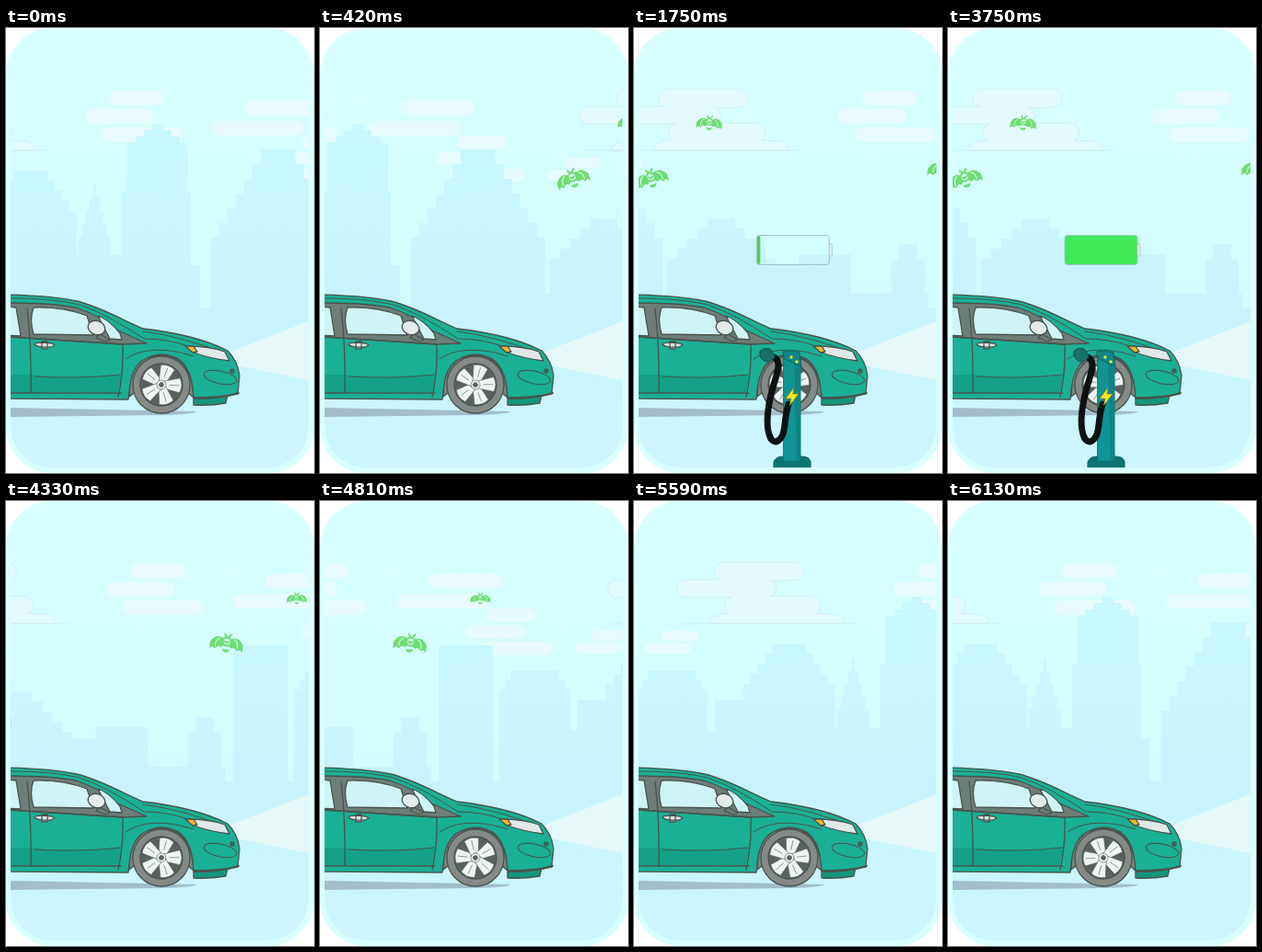
Animation of 335x484 px, one loop 6.16 s. Source, as an HTML page:

```html
<!DOCTYPE html>
<html lang="en">
<head>
<meta charset="utf-8">
<title>Electric car</title>
<style>
html, body { margin: 0; width: 100%; height: 100%; overflow: hidden; background: #fff; }
svg { display: block; width: 335px; height: 484px; }
</style>
</head>
<body>
<svg viewBox="0 0 335 484" fill="none" stroke-linejoin="round" stroke-linecap="round">
<defs>
  <linearGradient id="sky" x1="0" y1="0" x2="0" y2="1">
    <stop offset=".1" stop-color="#d8ffff"/><stop offset=".65" stop-color="#d1fbff"/>
  </linearGradient>
  <linearGradient id="haze" gradientUnits="userSpaceOnUse" x1="0" y1="100" x2="0" y2="478">
    <stop offset="0" stop-color="#c9f8ff"/><stop offset=".55" stop-color="#c8f3fe"/>
    <stop offset="1" stop-color="#cdf6ff"/>
  </linearGradient>
  <clipPath id="view"><rect x="5" y="5" width="324" height="473" rx="45"/></clipPath>
  <g id="bat">
    <path fill="#70dc73" d="M-4 -3Q-12 -8 -18 2Q-18 6 -18 10Q-15 5 -12 9Q-9 4 -6 7L0 3L6 7Q9 4 12 9Q15 5 18 10Q18 6 18 2Q12 -8 4 -3Z"/>
    <path stroke="#d8ffef" d="M-8 -3Q-13 0 -12 6M8 -3Q13 0 12 6"/>
    <circle r="4.500" fill="#d8ffef" stroke="#70dc73" stroke-width="2"/>
    <path stroke="#70dc73" stroke-width="2" d="M-1 -5L-3 -8M1 -5L4 -8M-2 0L0 1.500L2 0M-3 9L-1 11L0 9L1 11L3 9"/>
  </g>
</defs>

<rect width="335" height="484" rx="50" fill="#d9ffff"/>
<g clip-path="url(#view)">
  <rect x="5" width="324" height="478" fill="url(#sky)"/>
  <g id="clouds"></g>
  <g id="city"></g>
  <rect x="5" y="305" width="324" height="173" fill="url(#haze)"/>
  <g id="bats"></g>

  <path fill="#e5f8f8" d="M240 354L329 319V383L251 367Z"/>
  <path fill="#a3bdcb" d="M5 413L207 417Q205 420 170 421L5 423Z"/>

  <g stroke="#47544d" stroke-width="1.300">
    <path fill="#14967f" d="M204 401L241 399L239 408Q222 411 204 410Z"/>
    <path fill="#1ab096" d="M0 290Q48 291 77 297C105 304 125 317 149 327C175 330 214 337 241 351Q252 362 254 378L252 398Q230 402 204 402L202 385Q196 355 168 355Q137 357 133 404L0 403Z"/>
    <path fill="#14a088" stroke="none" d="M5 377H28L45 379Q90 381 126 377L122 396H5Z"/>
    <path fill="#6d7d77" d="M0 299Q50 299 76 304Q101 312 122 329L153 343L127 344L5 336Z"/>
    <path stroke-width="1" d="M5 294Q52 294 80 301Q110 311 150 338Q176 338 198 346M130 360Q152 345 190 353L204 357M31 379Q80 382 124 377M149 330Q190 335 239 354"/>
    <path d="M5 336L127 344Q128 375 122 401M23 305Q28 350 27 397M5 397H125"/>
    <path fill="#d0f4f5" d="M0 303L11 304L16 335L0 334ZM30 304Q62 303 88 313L95 334L30 333Q25 317 30 304ZM100 313Q112 317 124 332L126 339L113 338Z"/>
    <path fill="#6d7d77" d="M102 333L113 339L108 341L98 337Z"/>
    <ellipse cx="98.500" cy="326" rx="9.500" ry="7.500" fill="#e3ebeb" transform="rotate(18 98.500 326)"/>
    <path fill="#dbe5e3" d="M31 344Q33 341 50 343L53 345L49 347Q34 348 31 344ZM39 341H45V349H39Z"/>
    <path fill="#e0e9e8" d="M196 346Q222 346 238 352L243 362Q220 359 204 353Z"/>
    <path fill="#f4b52e" d="M195 346L204 346L208 352L203 353Z"/>
    <ellipse cx="233" cy="380" rx="18" ry="7" transform="rotate(12 233 380)" stroke-width="1"/>
    <circle cx="246" cy="373" r="2" fill="#2b786b"/>
    <path stroke-width="2" d="M205 403Q235 403 253 397"/>
    <path fill="#78837e" d="M134 401Q134 356 169 356Q202 357 204 402L190 390H148Z"/>
    <circle cx="169" cy="388" r="31" fill="#858a87"/>
    <circle cx="169" cy="388" r="23" fill="#59615f"/>
  </g>
  <g id="wheel" stroke="#59615f" stroke-width=".6" fill="#eef4f4"></g>

  <g id="battery">
    <rect id="charge" x="127" y="226" height="31" rx="2"/>
    <rect x="127" y="225.500" width="79" height="32" rx="3" stroke="#9fc4c9"/>
    <rect x="206" y="235" width="3" height="13" rx="1" fill="#e3f5f7" stroke="#b2c9cd"/>
  </g>

  <g id="pump">
    <path fill="#0b7473" stroke="#0a5f60" d="M152 478V472Q154 466 162 466H182Q191 466 192 472V478Z"/>
    <path fill="#109493" stroke="#0a7373" d="M163 357L181 358V471H163Z"/>
    <path fill="#0d8584" d="M174 358H181V471H177Z"/>
    <path fill="#118785" stroke="#0a6666" d="M162 352Q171 349 180 353L182 368L164 360Z"/>
    <circle cx="171" cy="358" r="1.700" fill="#f3e334"/><circle cx="177" cy="363" r="1.700" fill="#f3e334"/>
    <path stroke="#0c1213" stroke-width="7" d="M150 357C162 361 156 374 151 391C144 417 143 436 149 447Q155 454 161 444C165 437 163 426 168 409"/>
    <path fill="#19706a" stroke="#10534f" d="M137 352Q140 347 148 349L153 356Q152 363 144 363Q136 361 137 352Z"/>
    <path fill="#fbea20" stroke="#806f16" stroke-width=".6" d="M174 391L165 403H171L169 411L179 398H173Z"/>
  </g>
</g>
</svg>
<script>
const el = id => document.getElementById(id);
const LOOP = 6160, CITY = 872, CLOUDS = 604, BATS = 1045;

// A tower that widens by dx on both sides every dy, n times
function tower(left, right, top, n = 0, dx = 0, dy = 0) {
  let d = '';
  for (let i = 0; i <= n; i++)
    d += `M${left - i * dx} 305V${top + i * dy}H${right + i * dx}V305Z`;
  return d;
}

const skyline = `<path fill="url(#haze)" d="${
  tower(80, 110, 207, 4, 11, 11) + tower(145, 236, 258) + tower(179, 236, 246) +
  tower(0, 320, 289) + tower(288, 308, 235, 1, 8, 17) +
  tower(329, 388, 157) + tower(407, 460, 185, 2, 6, 10) +
  tower(469, 600, 250) + tower(480, 515, 216) + tower(543, 579, 155, 4, 8, 11) +
  tower(605, 660, 247) + tower(629, 632, 171, 4, 4, 14) +
  tower(693, 705, 104, 3, 9, 7) + tower(660, 735, 178) + tower(660, 745, 258) +
  tower(811, 849, 132, 6, 9, 16)
}"/>`;

function pill(x, y, w, h) {
  const r = h / 2;
  return `M${x + r} ${y}h${w - h}a${r} ${r} 0 0 1 0 ${h}h${h - w}a${r} ${r} 0 0 1 0 ${-h}Z`;
}

// A light cloud of stacked pills, scaled by k
function wisp(x, y, rows, k) {
  let d = '';
  for (let i = 0; i < rows; i++)
    d += pill(x + [26, 0, 18][i] * k, y + i * Math.min(22, 20 * k), (60 + 14 * i) * k, Math.min(16, 16 * k));
  return `<path fill="#e8fcff" d="${d}"/>`;
}

const sparkle = (x, y) => `<path stroke="#e8fdff" d="M${x - 5} ${y - 5}l10 10m0 -10l-10 10"/>`;

const bigCloud = `<path fill="#e3fbfe" stroke="#cdeef4" stroke-width="1.600" paint-order="stroke" d="${
  pill(27, 67, 97, 19) + pill(-14, 86, 108, 18) + pill(38, 104, 104, 20)
}M46 84H85V106H46ZM21 133Q24 124 34 123H156Q166 124 168 133Z"/><path stroke="#cdeef4" d="M-9 133H181"/>`;

const cloudArt = bigCloud + wisp(222, 68, 3, 1) + wisp(360, 79, 2, 1.35) +
  wisp(434, 117, 3, .9) + wisp(555, 141, 2, .68) +
  sparkle(123, 94) + sparkle(353, 77) + sparkle(517, 89) + sparkle(585, 117);

const bat = (x, y, scale, turn) =>
  `<use href="#bat" transform="translate(${x} ${y}) rotate(${turn}) scale(${scale})"/>`;
const batArt = bat(18, 162, 1, -18) + bat(82, 102, .78, 4) + bat(338, 153, 1, 8) + bat(414, 105, .6, 0);

function tile(id, art, period) {
  el(id).innerHTML = [-period, 0, period].map(x => `<g transform="translate(${x})">${art}</g>`).join('');
}
tile('city', skyline, CITY);
tile('clouds', cloudArt, CLOUDS);
tile('bats', batArt, BATS);

let spokes = '';
for (let a = 0; a < 360; a += 72)
  spokes += `<path transform="rotate(${a})" d="M-4 -3L-8 -20Q0 -24 8 -20L4 -3ZM0 -9V-19"/>`;
el('wheel').innerHTML = spokes + '<circle r="5"/><circle r="2.500" fill="#59615f"/>';

// Skyline distance: cruise, speed up, then a cubic ease-out stop
function travel(u) {
  const cruise = v => .2465 * v + .0485 * Math.max(0, v - 2130);
  if (u < 3000) return cruise(u);
  const p = Math.min(1, (u - 3000) / 910);
  return CITY - (CITY - cruise(3000)) * (1 - p) ** 3;
}

const move = (id, x, y = 0, turn = 0) =>
  el(id).setAttribute('transform', `translate(${x} ${y}) rotate(${turn})`);

function draw(t) {
  const u = (t + 2160) % LOOP; // time since departure
  const road = travel(u);
  move('city', -road % CITY);
  move('clouds', -road * 2 * CLOUDS / CITY % CLOUDS);
  move('bats', -road * BATS / CITY % BATS);
  move('wheel', 169, 388, road * 2.5 / 31 * 180 / Math.PI);

  const leaving = u < 2000;
  const charging = u >= 4160;
  const pumpX = 2.5 * ((leaving ? 0 : CITY) - road);
  move('pump', pumpX);

  // The battery glides in, then fills in eight steps
  const p = Math.min(Math.max((Math.min(u, 3910) - 3210) / 850, 0), 1);
  move('battery', leaving ? pumpX : charging ? 0 : 205 * (1 - p) ** 2);
  const step = Math.floor((u - 4160) / 250);
  const level = leaving ? 79 : charging ? 9 + 70 * (Math.min(7, step) / 7) ** 1.3 : 4;
  el('charge').setAttribute('width', level);
  el('charge').setAttribute('fill', level > 4 ? '#3fe958' : '#58cc58');
}

function frame() {
  draw(performance.now() % LOOP);
  requestAnimationFrame(frame);
}
frame();
</script>
</body>
</html>
```
